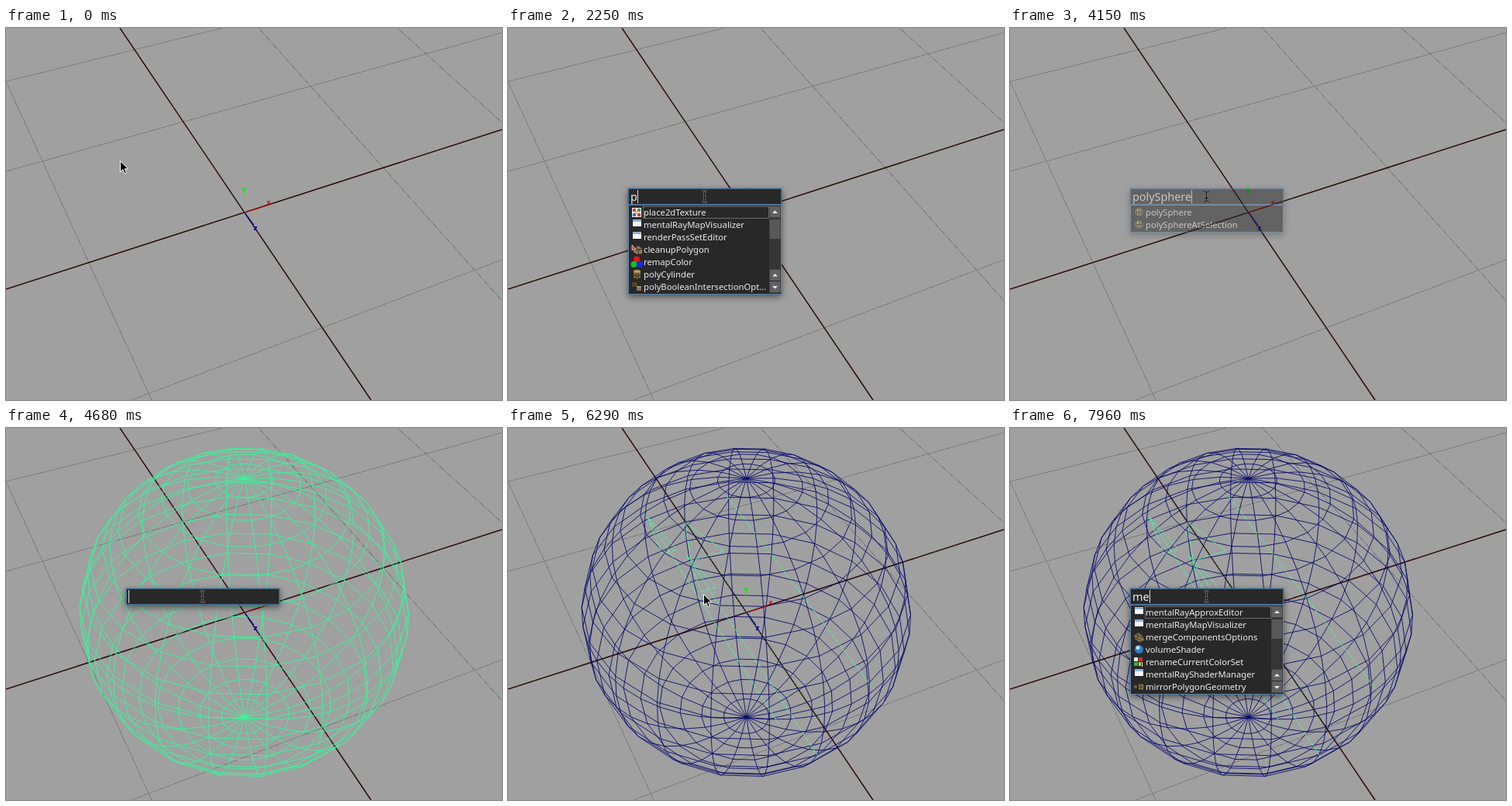
An HTML page for the animation above (8 s loop, 640x480 px).

```html
<!DOCTYPE html>
<html lang="en">
<head>
<meta charset="utf-8">
<title>Command search</title>
<style>
html, body { margin: 0; width: 100%; height: 100%; overflow: hidden; background: #a0a0a0; }
svg { position: absolute; left: 0; top: 0; overflow: visible; fill: none; }
#scene, #pointer { width: 640px; height: 480px; }
.crisp { shape-rendering: crispEdges; }
.axis { font: bold 8.5px "DejaVu Sans", sans-serif; text-anchor: middle; }
#popup {
  position: absolute; left: 155px; top: 207px; width: 198px;
  font-family: "Noto Sans", "Open Sans", sans-serif; color: #ececec; white-space: nowrap;
  filter: drop-shadow(0 3px 4px rgba(0,0,0,.5));
}
#field, #list { box-sizing: border-box; background: #282828; border: 1px solid #5883ab; }
#field {
  height: 21px; padding-left: 2px; font-size: 14.4px; line-height: 19px;
  border-color: #44698c; box-shadow: 0 0 0 1px rgba(75,115,150,.45);
}
#caret { display: inline-block; width: 1px; height: 17px; background: #ddd; vertical-align: top; margin-top: 1px; }
#list { position: relative; padding: 1px 0; overflow: hidden; }
.row { position: relative; height: 16px; padding-left: 19px; font-size: 11.25px; line-height: 16px; }
.row svg { left: 2px; width: 16px; height: 16px; }
.focus::after {
  content: ""; position: absolute; left: 18px; right: 0; top: 0; height: 14px;
  border: 1px dotted #aaa;
}
.long .focus::after { right: 15px; }
#bar { left: 181px; top: 1px; width: 15px; height: 112px; }
</style>
</head>
<body>
<svg id="scene" viewBox="0 0 640 480">
  <path class="crisp" stroke="#7e7e7e" d="M0 69L279 0M0 185L640 6M162 480L640 299M0 69L188 480M326 0L640 352M505 0L640 122"/>
  <path stroke="#2d0c0c" stroke-width="1.5" d="M147 0L471 480M0 337L640 131"/>
  <path id="ball" stroke-width=".85"/>
  <g id="light" stroke="#43ffa3" stroke-width=".9">
    <path id="rays" stroke-dasharray="6 2"/>
    <path id="core" stroke="#178a50" stroke-dasharray="2 3"/>
  </g>
  <path stroke="#e00000" d="M308 238L334 230"/>
  <path stroke="#0000d0" d="M308 238L320 254"/>
  <path stroke="#8fa58f" stroke-dasharray="1 1" d="M307.5 237V214"/>
  <g class="axis">
    <text x="307" y="212.5" fill="#00f000">Y</text>
    <text x="339" y="228" fill="#f00000">x</text>
    <text x="322" y="260.5" fill="#0000e0">z</text>
  </g>
</svg>
<div id="popup">
  <div id="field"><span id="typed"></span><span id="caret"></span></div>
  <div id="list"></div>
</div>
<svg id="pointer" viewBox="0 0 640 480">
  <path id="arrow" fill="#000" stroke="#fff" d="M.5 .5V14.5L3.8 11.6L6 16.8L8.3 15.8L6.1 10.8H10.6Z"/>
  <g id="beam">
    <path id="stem" d="M250 210.5Q253.5 210.5 253.5 213V222Q253.5 224.5 250 224.5M257 210.5Q253.5 210.5 253.5 213M253.5 222Q253.5 224.5 257 224.5M251 219.5H256"/>
  </g>
</svg>
<script>
const $ = id => document.getElementById(id);

// I-beam: dark line over a grey rim
const rim = $("stem").cloneNode();
rim.removeAttribute("id");
rim.setAttribute("stroke", "#777");
rim.setAttribute("stroke-width", 2.6);
$("beam").prepend(rim);
$("stem").setAttribute("stroke", "#111");

// Perspective camera orbiting the world origin
function project([x, y, z]) {
  const right = .906 * x + .424 * z, near = .906 * z - .424 * x;
  const k = 1165 / (5.575 - .7257 * near - .688 * y);
  return (307.5 + k * right).toFixed(1) + " " + (238 - k * (.7257 * y - .688 * near)).toFixed(1);
}
const line = pts => "M" + pts.map(project).join("L");
const count = n => [...Array(n).keys()];

// Unit sphere with 20 x 20 divisions
const onBall = (i, j) => {
  const lon = i * Math.PI / 10, lat = j * Math.PI / 20;
  return [Math.sin(lat) * Math.cos(lon), Math.cos(lat), Math.sin(lat) * Math.sin(lon)];
};
const rings = count(19).map(j => line(count(21).map(i => onBall(i, j + 1))));
const meridians = count(20).map(i => line(count(21).map(j => onBall(i, j))));
$("ball").setAttribute("d", rings.concat(meridians).join(""));

// Directional light: parallel arrows along -z
const shaft = (x, y) => line([[x, y, -1], [x, y, .97]]);
const head = (x, y, w) => line([[x, y, -1], [x - w, y, -.6], [x + w, y, -.6], [x, y, -1]]);
$("rays").setAttribute("d", shaft(.32, .12) + shaft(-.265, .13) + shaft(0, -.3) +
  head(0, 0, .12) + head(-.265, .13, .05) + head(0, -.3, .055));
$("core").setAttribute("d", shaft(0, 0));

const dot = (x, y, r, c) => `<circle cx="${x}" cy="${y}" r="${r}" fill="${c}"/>`;
const box = (x, y, w, h, c) => `<rect x="${x}" y="${y}" width="${w}" height="${h}" fill="${c}"/>`;
const icons = {
  win: box(3, 1, 11, 9, "#f4f6fa") + box(3, 1, 11, 3, "#8fb4dc"),
  tex: box(2, 2, 12, 12, "#eee") + dot(5, 5, 2.2, "#d33") + dot(11, 5, 2.2, "#3a9a4a") +
    dot(5, 11, 2.2, "#36b") + dot(11, 11, 2.2, "#d33") + dot(8, 8, 2, "#eb4"),
  clean: '<path fill="#8d7b58" d="M4 7L10 3L15 7V13L9 14L4 11Z"/><path stroke="#3a3020" d="M4 7L10 9L15 7M10 9V14M6 5L12 8"/><path fill="#d33" stroke="#eee" stroke-width=".7" d="M2 2V9L4 7.5L7 7Z"/>',
  rgb: dot(8, 4.5, 4, "#e01818") + dot(4.5, 11, 4, "#12c020") + dot(12, 11, 4, "#1c28e8"),
  cyl: '<path fill="#80683e" d="M4 4V12Q8 15 13 12V4Z"/><ellipse cx="8.5" cy="4" rx="4.5" ry="2" fill="#b59c68"/><path stroke="#3c3018" d="M7 6V13M10 6V13M4 9Q8 11 13 9"/>',
  bool: box(2, 2, 7, 6, "#4e4432") + box(8, 7, 6, 6, "#85704c") + box(8, 7, 6, 2, "#a89268"),
  ball: dot(8.5, 7.5, 5, "#9a8440") + dot(7, 6, 2, "#d8c888") + '<path stroke="#30280f" d="M3.5 7.5H13.5M8.5 2.5V12.5M5 4Q7 8 5 11M12 4Q10 8 12 11"/>',
  lamp: '<path stroke="#f0e020" stroke-width="1.6" d="M3 5L6 6M6 2L8 5M3 9L6 8"/><path stroke="#d8c818" stroke-width="1.3" d="M8 8L13 13M11 5L14 7"/>',
  blue: dot(8.5, 7.5, 5.5, "#2f7cc0") + dot(7, 5.5, 2.5, "#b8e0f8"),
  set: box(2, 2, 5, 5, "#e8e8e8") + box(8, 2, 5, 5, "#d03030") + box(2, 8, 5, 5, "#30b040") +
    box(8, 8, 3, 5, "#e0c030") + box(12, 8, 1, 6, "#eee"),
  merge: '<path fill="#8a7a50" d="M2 6L8 2L14 8L15 12L9 14L4 11Z"/><path stroke="#3c3420" d="M3 8L12 12M8 3L6 11M4 5L14 9"/>',
  mirror: '<path fill="#8a7a50" d="M8 5L13 4L15 8L13 12L8 11Z"/><path stroke="#3c3420" d="M8 8H15M11 4V12"/>' + dot(4, 8, 2, "#706444")
};
const barSvg = (() => {
  const tri = (y, up) => `<path fill="#eee" d="M4 ${y + (up ? 9 : 6)}H11L7.5 ${y + (up ? 5.5 : 9.5)}Z"/>`;
  const button = (y, up) => box(.5, y, 14, 14.5, "#606060") + tri(y, up);
  return `<svg id="bar"><defs><pattern id="weave" width="2" height="2" patternUnits="userSpaceOnUse">${
    box(0, 0, 1, 1, "#454545") + box(1, 1, 1, 1, "#454545")}</pattern></defs>` +
    box(0, 0, 15, 112, "#262626") + box(0, 15, 15, 66, "url(#weave)") +
    box(.5, 17, 14, 25, "#585858") + button(0, true) + button(81.5, true) + button(97, false) + "</svg>";
})();

const cylinder = "cyl polyCylinder", cut = "bool polyBooleanIntersectionOpt...";
const visualizer = "win mentalRayMapVisualizer", passes = "win renderPassSetEditor";
const approx = "win mentalRayApproxEditor", manager = "win mentalRayShaderManager";
const cleanup = "clean cleanupPolygon", remap = "rgb remapColor";
const sphere = "ball polySphere", sphereAt = "ball polySphereAtSelection";
const merge = "merge mergeComponentsOptions", mirror = "mirror mirrorPolygonGeometry";
const volume = "blue volumeShader", colorSet = "set renameCurrentColorSet";
const sun = "lamp directionalLight";

// Each cue changes part of the state from its time on
const cues = [
  [0, { pop: 0, text: "", list: [], caret: 1, ball: "", light: 0 }],
  [1010, { pop: 1 }],
  [1480, { caret: 0 }],
  [2020, { caret: 1 }],
  [2250, { text: "p", list: ["tex place2dTexture", visualizer, passes, cleanup, remap, cylinder, cut] }],
  [2490, { text: "po", list: [cylinder, cut, cleanup, merge, sphere, mirror, sphereAt] }],
  [2610, { text: "pol", list: [cleanup, cylinder, cut, sphere, mirror, sphereAt, "bool polyCube"] }],
  [2790, { text: "poly" }],
  [3080, { text: "polys", list: [sphere, sphereAt], plain: 1 }],
  [3800, { text: "polySphere" }],
  [4150, { pop: .5 }],
  [4210, { pop: 0, text: "", list: [], plain: 0, ball: "#2cff9a" }],
  [4620, { pop: .5 }],
  [4680, { pop: 1 }],
  [5040, { text: "d", list: ["tex place2dTexture", passes, remap, cylinder, manager, volume, sun] }],
  [5150, { text: "di", list: [sun, passes, approx, visualizer, cut, mirror, cylinder] }],
  [5280, { text: "dir", list: [sun] }],
  [5330, { text: "dire" }],
  [5510, { text: "direc" }],
  [5750, { text: "directionalLight" }],
  [6230, { pop: .5 }],
  [6290, { pop: 0, text: "", list: [], ball: "#000468", light: 1 }],
  [7370, { pop: .5 }],
  [7420, { pop: 1 }],
  [7480, { text: "m", list: [visualizer, approx, remap, merge, volume, manager, mirror] }],
  [7960, { text: "me", list: [approx, visualizer, merge, volume, colorSet, manager, mirror] }]
];

function row(item, i, plain) {
  const [icon, name] = item.split(" ");
  return `<div class="row${i || plain ? "" : " focus"}"><svg viewBox="0 0 16 16">${icons[icon]}</svg>${name}</div>`;
}

function show(s) {
  const long = s.list.length > 6;
  $("popup").style.opacity = s.pop;
  $("typed").textContent = s.text;
  $("caret").style.opacity = s.caret;
  $("list").style.display = s.list.length ? "block" : "none";
  $("list").style.height = s.list.length * 16 + 4 + "px";
  $("list").className = long ? "long" : "";
  $("list").innerHTML = s.list.map((item, i) => row(item, i, s.plain)).join("") + (long ? barSvg : "");
  $("ball").setAttribute("stroke", s.ball || "none");
  $("light").style.display = s.light ? "" : "none";
  $("arrow").style.display = s.pop ? "none" : "";
  $("beam").style.display = s.pop ? "" : "none";
}

function moveArrow(t) {
  const step = Math.max(0, Math.min(7, Math.floor((t - 360) / 68.3) + 1));
  const p = 1 - (1 - step / 7) ** 2;
  $("arrow").setAttribute("transform", `translate(${147 + 105 * p} ${171 + 43 * p + 90 * p * (1 - p)})`);
}

let start, last;
function frame(now) {
  start ??= now;
  const t = (now - start) % 8000;
  const past = cues.filter(c => c[0] <= t);
  if (past.length !== last) {
    last = past.length;
    show(Object.assign({}, ...past.map(c => c[1])));
  }
  moveArrow(t);
  requestAnimationFrame(frame);
}
requestAnimationFrame(frame);
</script>
</body>
</html>
```
